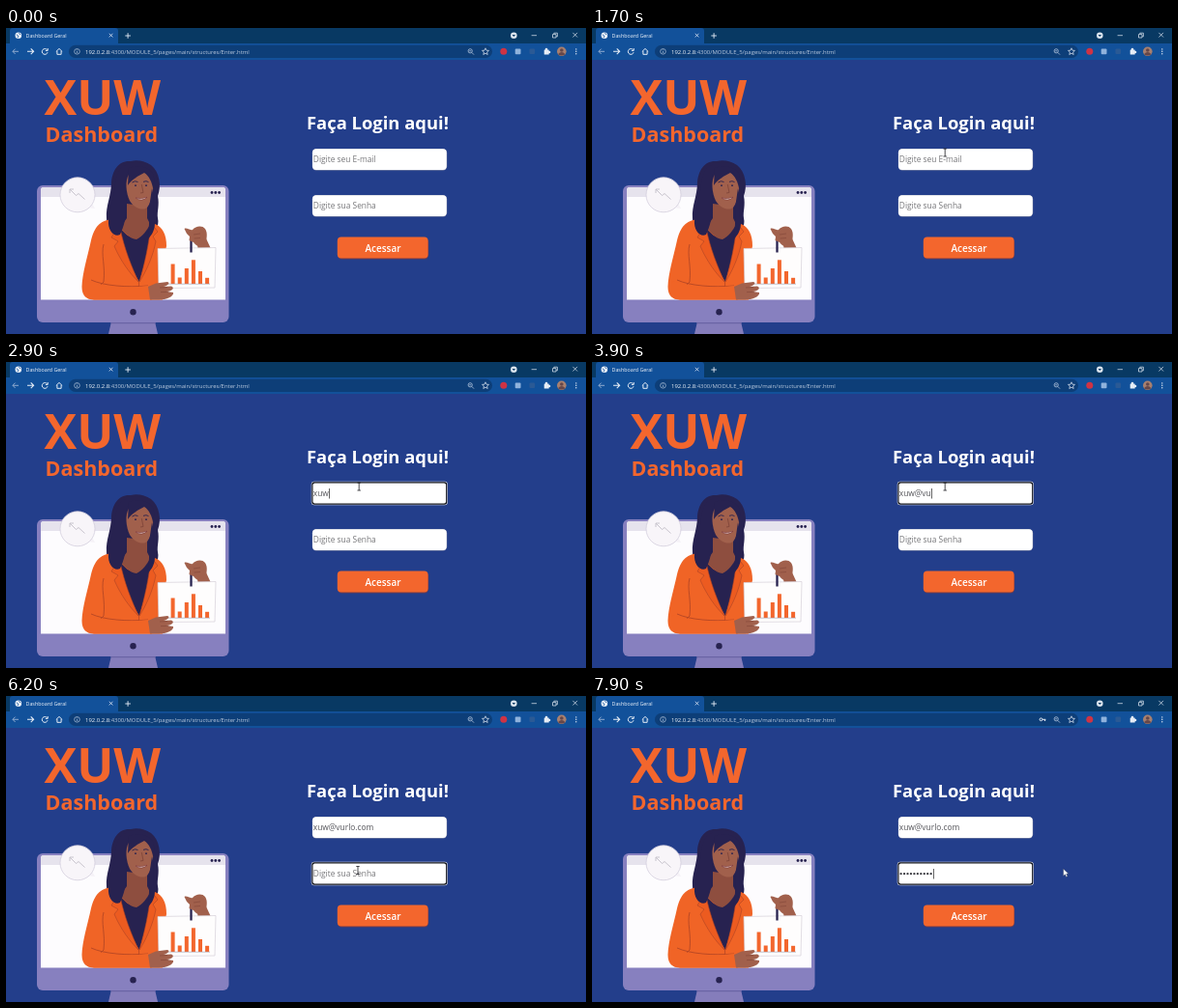
Write an HTML page with a canvas that moves like this. It is 600x317 px and loops after 8000 ms.

```html
<!DOCTYPE html>
<html lang="pt-BR">
<head>
<meta charset="utf-8">
<title>Login</title>
<style>
html, body { margin: 0; width: 100%; height: 100%; overflow: hidden; background: #233e8b; }
canvas { display: block; width: 600px; height: 317px; }
</style>
</head>
<body>
<canvas id="stage"></canvas>
<script>
const W = 600, H = 317, LOOP = 8000, STEP = 100;
const SANS = '"Open Sans", "Noto Sans", sans-serif';
const ORANGE = '#f3662d', JACKET = '#f06426', FOLD = '#ad4325';
const NAVY = '#272250', SKIN = '#a1604c', PURPLE = '#8780bf';
const EMAIL = 'xuw@vurlo.com';
const EMAIL_KEYS = [2100, 2500, 2700, 3400, 3700, 3900, 4100, 4300, 4500, 4700, 5000, 5200, 5400];
const SECRET_KEYS = Array.from({ length: 10 }, (_, i) => 6600 + i * 90);
const FOCUS_EMAIL = 1900, FOCUS_SECRET = 5600;

const canvas = document.getElementById('stage');
const scale = window.devicePixelRatio || 1;
canvas.width = W * scale;
canvas.height = H * scale;
const ctx = canvas.getContext('2d');

function shape(d, fill, stroke, width = 1) {
  const p = new Path2D(d);
  if (fill) { ctx.fillStyle = fill; ctx.fill(p); }
  if (stroke) {
    ctx.strokeStyle = stroke;
    ctx.lineWidth = width;
    ctx.stroke(p);
  }
}
const line = (d, color, width) => shape(d, null, color, width);

function rect(x, y, w, h, fill, r = 0) {
  ctx.fillStyle = fill;
  ctx.beginPath();
  ctx.roundRect(x, y, w, h, r);
  ctx.fill();
}

function circle(x, y, r, fill, stroke, width = 1) {
  ctx.beginPath();
  ctx.arc(x, y, r, 0, Math.PI * 2);
  if (fill) { ctx.fillStyle = fill; ctx.fill(); }
  if (stroke) { ctx.strokeStyle = stroke; ctx.lineWidth = width; ctx.stroke(); }
}

function text(s, x, y, size, color, weight = 400) {
  ctx.font = `${weight} ${size}px ${SANS}`;
  ctx.fillStyle = color;
  ctx.fillText(s, x, y);
  return x + ctx.measureText(s).width;
}

function browser(showKey) {
  const ink = '#e6edf6', soft = '#b4c6dd';
  rect(0, 0, W, 16, '#083963');
  rect(0, 16, W, 17, '#12519a');
  rect(4, 0, 112, 16, '#12519a', [3, 3, 0, 0]);
  circle(12.8, 7.8, 3.3, '#eef3fa');
  line('M10.8 6.8 L12.8 8.2 L12.1 10.2 M13.3 5.2 L15.1 7.2', '#12519a', 0.8);
  text('Dashboard Geral', 20.5, 9.8, 5.35, '#f2f6fb');
  line('M106.8 5.8 L110.4 9.4 M110.4 5.8 L106.8 9.4', ink, 0.8);
  line('M123.3 8 H128.9 M126.1 5.2 V10.8', ink, 0.9);

  circle(525.3, 7.8, 3.3, '#dbe4ee');
  shape('M523.6 7 H527 L525.3 9.1 Z', '#083963');
  line('M543.6 7.7 H549', ink, 0.7);
  line('M565.5 6.6 H569 V10 H565.5 Z M566.8 6.4 V5.2 H570.4 V8.8 H569.2', ink, 0.7);
  line('M586.4 4.9 L591 9.5 M591 4.9 L586.4 9.5', ink, 0.7);

  line('M13 24.3 H7 M9.6 21.6 L6.9 24.3 L9.6 27', '#8fabcf', 1);
  line('M22 24.3 H28.5 M25.7 21.4 L28.6 24.3 L25.7 27.2', ink, 1.1);
  line('M42.6 22.8 A2.9 2.9 0 1 0 43 25.2 M43.2 21 V23.4 H40.8', ink, 1);
  line('M51.8 24.5 L55 21.4 L58.2 24.5 M52.9 24 V27.3 H57.1 V24', ink, 1);

  rect(65, 17.8, 438, 13.2, '#0d3e78', 6.6);
  circle(73.5, 24.3, 2.8, null, soft, 0.7);
  line('M73.5 23.8 V26 M73.5 22.4 V23.1', soft, 0.7);
  const end = text('192.0.2.8', 82, 26.5, 5.95, '#f1f5fa');
  text(':4300/MODULE_5/pages/main/structures/Enter.html', end, 26.5, 5.95, '#bccbdf');
  if (showKey) {
    circle(464.5, 24.3, 1.4, null, ink, 1);
    line('M466 24.3 H469.4 M468.6 24.3 V26', ink, 1);
  }
  circle(480.2, 23.8, 2.1, null, soft, 0.8);
  line('M481.8 25.4 L484 27.6 M479.2 23.8 H481.2', soft, 0.8);
  shape('M496 20.8 L497 23.2 L499.5 23.4 L497.6 25 L498.2 27.5 L496 26.2 L493.8 27.5 L494.4 25 L492.5 23.4 L495 23.2 Z', null, ink, 0.7);

  circle(514.8, 24.3, 3.5, '#cf3344');
  rect(526.7, 21.5, 5.8, 5.8, '#8fb2dc', 1);
  rect(541.5, 21.5, 5.6, 5.6, '#2a5a95', 1);
  rect(556.7, 22.4, 5, 5, ink, 0.5);
  circle(559, 22, 1.3, ink);
  circle(562, 25, 1.3, ink);
  circle(574.8, 24.3, 4.8, '#a8806f');
  circle(574.8, 23, 1.8, '#65474a');
  shape('M571 27.2 Q574.8 22.8 578.6 27.2 Q574.8 30 571 27.2 Z', '#65474a');
  for (const y of [21.9, 24.3, 26.7]) circle(589.8, y, 0.7, ink);
}

function monitor() {
  shape('M109 304 H154 L157 317 H106 Z', '#857dbb');
  rect(108.5, 304, 46, 2.2, '#6a64a5');
  rect(32, 163, 198.5, 142, PURPLE, 6);
  rect(36, 165, 191, 116.5, '#fdfcfe', [3, 3, 0, 0]);
  rect(36, 165, 191, 10, '#e6e3ed', [3, 3, 0, 0]);
  for (const x of [213, 216.8, 220.6]) circle(x, 170.5, 1.4, NAVY);
  circle(131.5, 294.2, 3.2, NAVY);
  shape('M83 186 L92 187 L88 180 Z', '#f5f2f7');
  circle(74, 172.8, 18, '#f8f5f9', '#d3cfdd', 0.8);
  line('M66.5 167.5 L72.5 173.5 L75 171.5 L81.5 177.5 M66 171 V167 H70', '#b3afba', 0.7);
}

function woman() {
  // Hair behind the head
  shape('M129 138 C116 137 110 148 109 160 C109 174 103 184 104 197 C104 209 109 216 116 219 L146 216 C154 212 159 205 157 197 C156 190 159 184 157 174 C161 164 159 149 150 142 C144 138 136 136 129 138 Z', NAVY);
  // Jacket, neck and blouse
  shape('M109 198 C97 200 92 205 88 220 C84 238 79 254 78.5 268 C78.5 277 83 281.5 91 281.5 H162 L164 268 L163 240 L166 226 C166 214 162 206 154 203 L130 209 Z', JACKET);
  shape('M125 182 L146 185 L146 197 L149 203 C145 213 140 218 135 220 C127 217 121 210 118 207 L125 197 Z', '#8e4e3f');
  shape('M117 206 C122 212 128 218 135 219 C141 216 146 210 149 203 L151 211 C147 231 142 249 138 263 C130 250 121 229 117 206 Z', NAVY);
  // Lapels and sleeve folds
  shape('M116 205 L109 217 L116 221 L112 226 C119 242 128 254 137 263 C130 247 122 228 118 207 Z', '#ec5b20', FOLD, 0.6);
  shape('M150 202 L157 211 L152 216 L155 221 C152 237 145 252 138 263 C143 246 148 224 150 202 Z', '#ec5b20', FOLD, 0.6);
  line('M137.5 263 L138 281', FOLD, 0.7);
  line('M101 224 C98 235 103 246 101 263 M88 261 C101 267 125 269 147 267 M101 263 L96 268', FOLD, 0.8);
  // Face
  shape('M127 152 C133 147 146 147 150 154 C154 164 152 178 146 186 C141 190 132 186 128 179 C124 171 123 158 127 152 Z', SKIN);
  shape('M130 142 C124 148 122 161 125 178 C124 190 125 199 118 214 C112 217 105 210 106 199 C107 188 112 175 113 162 C114 149 120 139 130 142 Z', NAVY);
  shape('M127 145 C133 142 147 142 152 151 C154 155 153 163 152 166 C151 160 148 153 143 150 C137 153 130 157 126 163 Z', NAVY);
  line('M130.5 160 Q133.5 157.7 136.5 159.5 M142 159.4 Q145 157.8 147.5 159.6', NAVY, 0.9);
  circle(134, 163.2, 0.9, NAVY);
  circle(145, 163.2, 0.9, NAVY);
  line('M140.3 162 L142 170.5 L139 171', '#7d4338', 0.8);
  shape('M134 176 Q140 177.8 146 175.3 Q140.5 180.5 134 176 Z', '#e9d7d4', '#7c363a', 0.6);
  shape('M151 166 C155 181 151 192 154 202 C154 211 149 217 146 219 C149 206 148 192 148.5 183 Z', NAVY);
}

function card() {
  // Raised forearm goes behind the card
  shape('M197 219 L207 218 L213 231 H199 Z', SKIN);
  shape('M157 228.5 L217 227.5 L216 269 L158 269.5 Z', '#fefdfd', '#d6d0d9', 0.7);
  const tops = [244.5, 258.5, 249, 240.3, 252, 258.8];
  tops.forEach((y, i) => rect(170.6 + i * 7.1, y, 4, 265 - y, ORANGE));
  line('M167 265.2 H211', '#9a95a5', 0.6);
  // Fist with pen
  line('M191.5 218 V232.5', NAVY, 2.3);
  shape('M184.5 208 C187 206.5 190 210 193 209 C196 205 203 204 206 208 C209 212 207.5 219 206.5 223 C204 228 197 227 194 222 L189.5 220 L190 216 L187 213 Z', SKIN);
  line('M194 214 L201 213 M194.5 218 L201 217.5', '#824638', 0.6);
  // Arm and hand under the card
  shape('M84 262 C101 268 125 270 147 267 L151 281.5 H91 C84 280 79 274 80 268 Z', JACKET);
  shape('M147 268 L155 264.5 L167 263 C170 264 168 266.5 163 268 L171 267.5 C175 269 172 272.5 166 273 L173 274 C174 278 166 281.5 158 281.5 H149 Z', SKIN);
  line('M159 269 L167 268.6 M160 273.6 L168 273.4', '#824638', 0.6);
}

function field(y, focused) {
  if (focused) {
    rect(315.8, y - 1.2, 141, 24.4, '#e9ebf5', 3);
    rect(316.3, y - 0.7, 140, 23.4, '#10131c', 2.6);
    rect(317.5, y + 0.5, 137.6, 21, '#fff', 2);
  } else {
    rect(316.8, y, 139.4, 22.4, '#8c8fa8', 4.2);
    rect(317, y + 0.2, 138.8, 21.7, '#fff', 4);
  }
}

function caret(x, y, since) {
  if (Math.floor(since / 500) % 2 === 0) rect(x + 0.3, y - 8.2, 0.7, 10.6, '#222');
}

const typed = (keys, t) => keys.filter(k => k <= t).length;

function form(t) {
  const onEmail = t >= FOCUS_EMAIL && t < FOCUS_SECRET;
  const onSecret = t >= FOCUS_SECRET;
  const chars = typed(EMAIL_KEYS, t), dots = typed(SECRET_KEYS, t);

  text('Faça Login aqui!', 311, 105.4, 18.4, '#fff', 700);
  field(125, onEmail);
  field(173, onSecret);

  const hint = '#77777a', x = 317.8;
  const end = chars ? text(EMAIL.slice(0, chars), x, 139.2, 8.4, '#55555a')
    : (text('Digite seu E-mail', x, 139.2, 8.4, hint), x - 0.5);
  if (onEmail) caret(end, 139.2, t - (EMAIL_KEYS[chars - 1] || FOCUS_EMAIL));

  if (dots) {
    for (let i = 0; i < dots; i++) circle(319.6 + i * 3.45, 184.2, 1.15, '#3c3c42');
  } else {
    text('Digite sua Senha', x, 187.2, 8.4, hint);
  }
  if (onSecret) {
    caret(dots ? 318.3 + dots * 3.45 : x - 0.5, 187.2, t - (SECRET_KEYS[dots - 1] || FOCUS_SECRET));
  }

  if (chars === 1) suggestions();

  rect(343, 217.4, 94.2, 22.2, '#6f3a4c', 4.5);
  rect(342.8, 216.5, 93.8, 22, ORANGE, 4);
  text('Acessar', 371.4, 231.9, 10, '#fff', 600);
}

function suggestions() {
  ctx.save();
  ctx.beginPath();
  ctx.rect(316, 148.4, 141, 29.8);
  ctx.clip();
  rect(316, 148.4, 141, 29.8, '#fff');
  text('dilbo.rez@fmule.com', 321.7, 163, 6, '#17171b');
  text('nerilda305@fmule.com', 321.7, 180, 6, '#17171b');
  ctx.restore();
}

function mix(a, b, t, from, to) {
  const k = Math.min(1, Math.max(0, (t - from) / (to - from)));
  const e = k * k * (3 - 2 * k);
  return [a[0] + (b[0] - a[0]) * e, a[1] + (b[1] - a[1]) * e];
}

function pointer(t) {
  if (t < 300) return;
  const first = [365.2, 129], second = [364, 180.5];
  let [x, y] = mix([548, 16], first, t, 300, 1400);
  if (t >= 5400) [x, y] = mix(first, second, t, 5400, 5600);
  if (t >= 7300) [x, y] = mix(second, [487.6, 179], t, 7300, 7800);
  const inField = x > 317 && x < 456 && ((y > 125 && y < 147) || (y > 173 && y < 195));
  if (inField) {
    line(`M${x - 1.7} ${y - 4} H${x + 1.7} M${x} ${y - 4} V${y + 4} M${x - 1.7} ${y + 4} H${x + 1.7}`, '#1b1b20', 0.8);
  } else {
    shape(`M${x} ${y} v7.4 l1.8 -1.6 l1.2 2.6 l1.3 -0.6 l-1.2 -2.5 h2.3 Z`, '#fff', '#24304e', 0.4);
  }
}

function draw(t) {
  ctx.setTransform(scale, 0, 0, scale, 0, 0);
  rect(0, 0, W, H, '#233e8b');
  browser(t >= 7000);
  text('XUW', 39.5, 90, 50.5, ORANGE, 700);
  text('Dashboard', 40.6, 118, 21.5, ORANGE, 700);
  monitor();
  woman();
  card();
  form(t);
  pointer(t);
}

const start = performance.now();
function frame() {
  const t = (performance.now() - start) % LOOP;
  draw(Math.floor(t / STEP) * STEP);
  requestAnimationFrame(frame);
}
frame();
</script>
</body>
</html>
```
